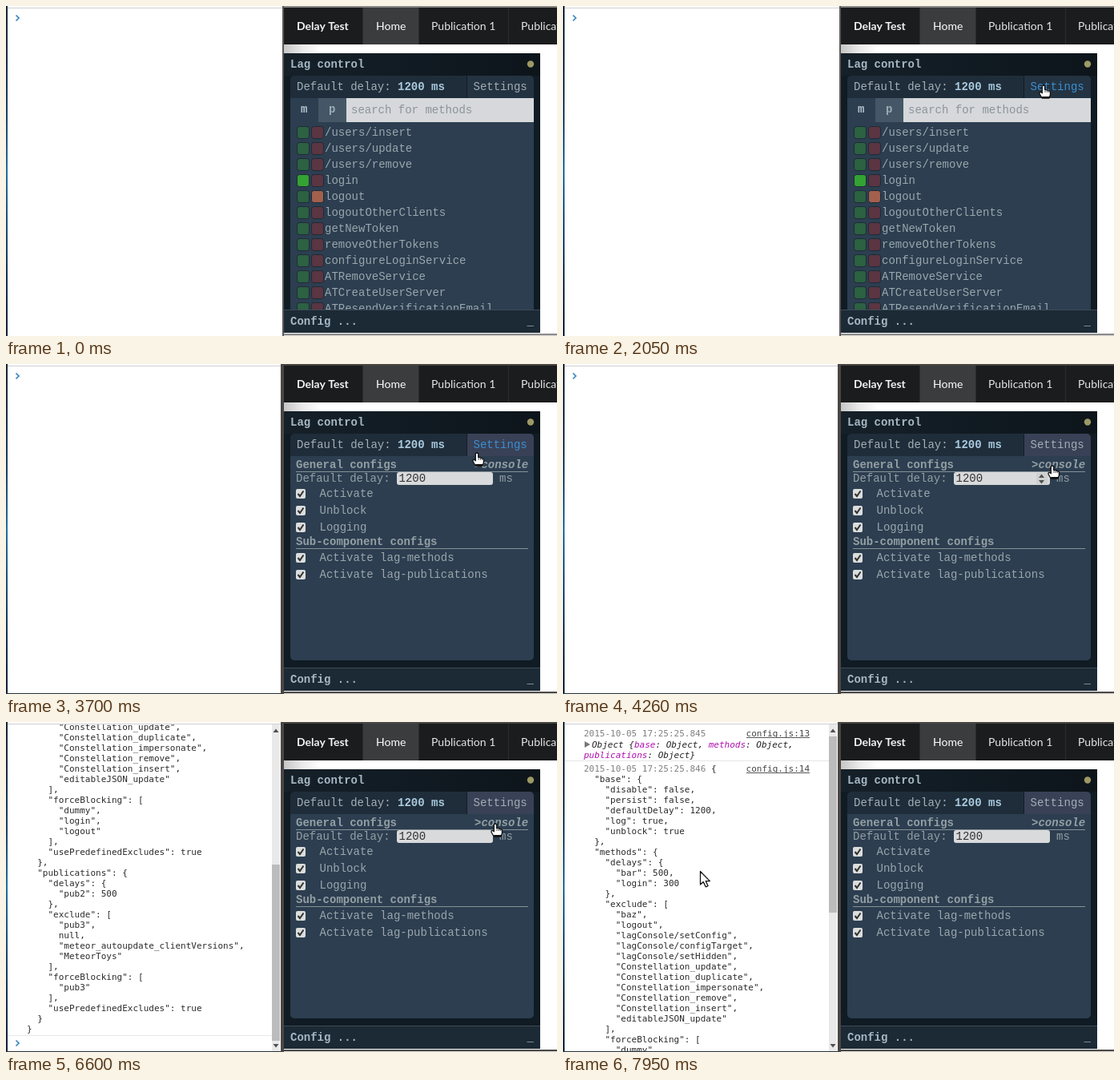
Write an HTML page with a canvas that moves like this. It is 688 by 412 pixels and loops after 8000 ms.

```html
<!DOCTYPE html>
<html lang="en">
<head>
<meta charset="utf-8">
<title>Lag control</title>
<style>
html, body { margin: 0; width: 100%; height: 100%; overflow: hidden; background: #fff; }
canvas { display: block; width: 688px; height: 412px; }
</style>
</head>
<body>
<canvas id="stage" width="688" height="412"></canvas>
<script>
const ctx = document.getElementById('stage').getContext('2d');
const LOOP = 8000;
const MONO = '14px "Liberation Mono", monospace';
const BOLD = 'bold ' + MONO;
const LOG = '11px "DejaVu Sans Mono", monospace';
const NAV = '14px Lato, sans-serif';
const TIP = '14.8px "Open Sans", sans-serif';
const SCROLL_MAX = 299;

const config = {
  base: { disable: false, persist: false, defaultDelay: 1200, log: true, unblock: true },
  methods: {
    delays: { bar: 500, login: 300 },
    exclude: ['baz', 'logout', 'lagConsole/setConfig', 'lagConsole/configTarget',
      'lagConsole/setHidden', 'Constellation_update', 'Constellation_duplicate',
      'Constellation_impersonate', 'Constellation_remove', 'Constellation_insert',
      'editableJSON_update'],
    forceBlocking: ['dummy', 'login', 'logout'],
    usePredefinedExcludes: true
  },
  publications: {
    delays: { pub2: 500 },
    exclude: ['pub3', null, 'meteor_autoupdate_clientVersions', 'MeteorToys'],
    forceBlocking: ['pub3'],
    usePredefinedExcludes: true
  }
};
const logLines = JSON.stringify(config, null, 2).split('\n');
const methods = ['/users/insert', '/users/update', '/users/remove', 'login', 'logout',
  'logoutOtherClients', 'getNewToken', 'removeOtherTokens', 'configureLoginService',
  'ATRemoveService', 'ATCreateUserServer', 'ATResendVerificationEmail'];

// Pointer moves: start, end, from, to
const moves = [
  [970, 1290, 199, 394, 409, 254],
  [1290, 1770, 409, 254, 574, 111],
  [1770, 2050, 574, 111, 600, 99],
  [3660, 3900, 600, 99, 530, 168],
  [4000, 4260, 530, 168, 611, 127],
  [4260, 4430, 611, 127, 620, 116],
  [4580, 4700, 620, 116, 616, 121],
  [6000, 6200, 616, 121, 611, 127],
  [7170, 7570, 611, 127, 171, 186]
];
const arrow = new Path2D('M.5 .5V17L4.2 13.6L7.2 19.8L10 18.6L7.2 12.6H12.4Z');
const hand = new Path2D('M-1.7 1Q0-1 1.7 1V5.4L4.5 5.8L8.4 7.5V12L7 16H-1.8L-5 10.5Q-5.2 8-3.2 8.5L-1.7 9.8Z');

const clamp = v => Math.max(0, Math.min(1, v));
const mix = (a, b, k) => a + (b - a) * k;

function rect(x, y, w, h, color) {
  ctx.fillStyle = color;
  ctx.fillRect(x, y, w, h);
}

function round(x, y, w, h, r, color, stroke) {
  ctx.beginPath();
  ctx.roundRect(x, y, w, h, r);
  ctx.fillStyle = color;
  ctx.fill();
  if (stroke) {
    ctx.strokeStyle = stroke;
    ctx.lineWidth = 1;
    ctx.stroke();
  }
}

function poly(color, ...p) {
  ctx.beginPath();
  for (let i = 0; i < p.length; i += 2) ctx.lineTo(p[i], p[i + 1]);
  ctx.fillStyle = color;
  ctx.fill();
}

function text(str, x, y, font, color) {
  ctx.font = font;
  ctx.fillStyle = color;
  ctx.fillText(str, x, y);
}

function gradient(x0, y0, x1, y1, ...colors) {
  const g = ctx.createLinearGradient(x0, y0, x1, y1);
  colors.forEach((c, i) => g.addColorStop(i / (colors.length - 1), c));
  return g;
}

function prompt(y) {
  ctx.beginPath();
  ctx.moveTo(12.5, y - 3.5);
  ctx.lineTo(16, y);
  ctx.lineTo(12.5, y + 3.5);
  ctx.strokeStyle = '#3a87bd';
  ctx.lineWidth = 1.7;
  ctx.stroke();
}

function scrollAt(t) {
  if (t < 7830) return SCROLL_MAX;
  const step = Math.min(4, Math.floor((t - 7830) / 40) + 1);
  return SCROLL_MAX * (1 - step / 4);
}

function drawLog(scroll) {
  ctx.save();
  ctx.beginPath();
  ctx.rect(2, 3, 330, 408);
  ctx.clip();
  ctx.translate(0, -Math.round(scroll));
  const stamp = (y, end, line) => {
    text('2015-10-05 17:25:25.' + end, 26, y, LOG, '#808080');
    text('config.js:' + line, 228.6, y, LOG, '#454545');
    rect(229, y + 1, 79, 1, '#555');
  };
  stamp(18, 845, 13);
  poly('#777', 27, 24, 34, 28, 27, 32);
  const italic = 'italic ' + LOG;
  let x = 36;
  const put = (s, color) => {
    text(s, x, 32, italic, color);
    x += ctx.measureText(s).width;
  };
  put('Object {', '#222');
  put('base', '#b010b0');
  put(': Object, ', '#222');
  put('methods', '#b010b0');
  put(': Object,', '#222');
  text('publications', 26, 45, italic, '#b010b0');
  text(': Object}', 26 + ctx.measureText('publications').width, 45, italic, '#222');
  rect(2, 48, 330, 1, '#e6e6e6');
  stamp(62, 846, 14);
  logLines.forEach((line, i) => text(line, i ? 26 : 185, 62 + 13 * i, LOG, '#2a2a2a'));
  rect(2, 690, 330, 1, '#e8e8e8');
  prompt(700);
  ctx.restore();

  rect(332, 3, 10, 408, '#e9e9e9');
  rect(332, Math.round(mix(18, 178, scroll / SCROLL_MAX)), 10, 220, '#bcbcbc');
  poly('#505050', 333.5, 13, 337, 8.5, 340.5, 13);
  poly('#505050', 333.5, 402, 337, 406.5, 340.5, 402);
}

function drawLeft(t) {
  rect(0, 0, 346, 412, '#fff');
  rect(0, 0, 2, 412, gradient(0, 0, 0, 412, '#16283a', '#1a2f48', '#1d4468', '#2470a4', '#1b4e7c', '#173250', '#10223a'));
  rect(2, 2, 343, 1, '#cfcfcf');
  if (t < 6600) prompt(15);
  else drawLog(scrollAt(t));
}

function drawPage(active) {
  rect(346, 0, 342, 412, '#fff');
  rect(346, 0, 342, 2, active ? '#4a4744' : '#8b8a88');
  rect(347, 2, 341, 46, '#1b1c1d');
  rect(446, 2, 69, 46, '#3b3c3d');
  [445, 515, 627].forEach(x => rect(x, 2, 1, 46, '#2b2c2d'));
  text('Delay Test', 363, 30, 'bold ' + NAV, '#f2f2f2');
  text('Home', 462, 30, NAV, '#fff');
  text('Publication 1', 531, 30, NAV, '#e6e6e6');
  text('Publication 2', 643, 30, NAV, '#e6e6e6');
  rect(347, 48, 46, 11, gradient(347, 0, 393, 0, '#c6c6c6', '#eaeaea', '#fff'));
  const edge = active ? '#4a4744' : '#8b8a88';
  rect(346, 408, 342, 1, '#fff');
  rect(346, 409, 342, 2, edge);
  rect(346, 411, 342, 1, '#d5d5d5');
  if (active) {
    rect(343, 0, 4, 412, '#4a4644');
    rect(0, 411, 343, 1, '#26323c');
  } else {
    rect(345, 0, 2, 412, '#5b5957');
  }
}

function drawMethods() {
  rect(355, 115, 304, 264, '#2c3e50');
  rect(390, 115, 35, 30, '#455766');
  rect(425, 115, 234, 30, '#d6d8db');
  text('m', 368, 133, BOLD, '#b4c2cc');
  text('p', 403, 133, BOLD, '#9cacb7');
  text('search for methods', 431, 134, MONO, '#8c9499');
  ctx.save();
  ctx.beginPath();
  ctx.rect(355, 145, 304, 234);
  ctx.clip();
  methods.forEach((name, i) => {
    const y = 150.5 + 20 * i;
    round(363.5, y, 15, 15, 3, name === 'login' ? '#33a333' : '#2c6142', '#1c2b36');
    round(381.5, y, 15, 15, 3, name === 'logout' ? '#a2604d' : '#5b3542', '#1f2a35');
    text(name, 398, 162 + 20 * i, MONO, '#9aa6ab');
  });
  ctx.restore();
}

function checkRow(label, y) {
  round(362, y - 5, 12, 12, 2, '#dcdddd');
  ctx.beginPath();
  ctx.moveTo(364.5, y + 1);
  ctx.lineTo(367, y + 4);
  ctx.lineTo(371.5, y - 2.5);
  ctx.strokeStyle = '#333';
  ctx.lineWidth = 2;
  ctx.stroke();
  text(label, 391.5, y + 5, MONO, '#9aa6ab');
}

function drawSettings(spinner) {
  round(355, 115, 304, 255, [0, 0, 5, 5], '#2c3e50');
  text('General configs', 362, 130, BOLD, '#949fa4');
  text('>console', 585, 130, 'italic ' + BOLD, '#949fa4');
  rect(362, 134, 290, 1, '#879197');
  text('Default delay:', 362, 147, MONO, '#949fa4');
  round(488, 135, 120, 16, 3, '#d8dadb');
  text('1200', 490.5, 147, MONO, '#333');
  text('ms', 616, 147, MONO, '#949fa4');
  if (spinner) {
    rect(591, 136, 14, 14, '#cfd0d0');
    poly('#505050', 594, 142, 597.5, 137.5, 601, 142);
    poly('#505050', 594, 145, 597.5, 149.5, 601, 145);
  }
  checkRow('Activate', 161);
  checkRow('Unblock', 182);
  checkRow('Logging', 203);
  text('Sub-component configs', 362, 226, BOLD, '#949fa4');
  rect(362, 230, 290, 1, '#879197');
  checkRow('Activate lag-methods', 241);
  checkRow('Activate lag-publications', 262);
}

function drawPanel(t) {
  rect(347, 59, 320, 349, '#101b23');
  rect(347, 59, 320, 28, gradient(347, 0, 667, 0, '#152029', '#0d151b'));
  text('Lag control', 355, 77, BOLD, '#a6b8c4');
  ctx.beginPath();
  ctx.arc(655, 72.5, 4.2, 0, 7);
  ctx.fillStyle = '#9c9965';
  ctx.fill();

  round(355, 87, 304, 28, [5, 5, 0, 0], '#1f2d3a');
  const k = clamp((t - 3240) / 240);
  const tab = [[36, 57], [51, 65], [65, 86]].map(([a, b]) => Math.round(mix(a, b, k)));
  round(576, 87, 83, 28, [0, 5, 0, 0], `rgb(${tab})`);
  rect(575, 87, 1, 28, '#121c25');
  text('Default delay: ', 363, 105, MONO, '#a2afb7');
  text('1200 ms', 489, 105, BOLD, '#a9cade');
  const hover = t >= 1810 && t < 3740;
  text('Settings', 583.5, 105, MONO, hover ? '#3b8fd2' : '#a3adb3');

  if (t < 3330) drawMethods();
  else drawSettings(t >= 3780 && t < 5050);

  rect(347, 379, 320, 29, '#1c2a36');
  rect(347, 379, 320, 1, '#3c4a56');
  text('Config ...', 355, 398, BOLD, '#a6b8c4');
  text('_', 650.5, 398, MONO, '#a6b8c4');
}

function tooltip(str, x, y, alpha) {
  if (alpha <= 0) return;
  ctx.save();
  ctx.globalAlpha = alpha;
  ctx.shadowColor = 'rgba(0,0,0,.35)';
  ctx.shadowBlur = 26;
  ctx.shadowOffsetY = 3;
  rect(x, y, 700 - x, 21, '#000');
  ctx.shadowColor = 'transparent';
  text(str, x + 3, y + 16, TIP, '#fff');
  ctx.restore();
}

// Value of the last [time, value] pair already reached
const stepAt = (t, pairs) => pairs.reduce((v, [at, next]) => t >= at ? next : v, 0);

function drawPointer(t) {
  if (t < 970) return;
  let x, y;
  for (const [start, end, x0, y0, x1, y1] of moves) {
    if (t < start) break;
    const held = t >= end ? end : start + Math.floor((t - start) / 40) * 40;
    const k = clamp((held - start) / (end - start));
    x = mix(x0, x1, k);
    y = mix(y0, y1, k);
  }
  const isHand = (t >= 1810 && t < 3740) || (t >= 4220 && t < 7250);
  const shape = isHand ? hand : arrow;
  ctx.save();
  ctx.translate(Math.round(x), Math.round(y));
  ctx.lineJoin = 'round';
  ctx.strokeStyle = '#111';
  ctx.lineWidth = 1.3;
  ctx.fillStyle = '#fff';
  ctx.fill(shape);
  ctx.stroke(shape);
  if (isHand) {
    [1.7, 4, 6.2].forEach(fx => rect(fx, 6, 0.8, 3, '#222'));
    rect(-1.8, 14, 9, 2, '#111');
  }
  ctx.restore();
}

function draw(t) {
  drawLeft(t);
  drawPage(t >= 3240);
  drawPanel(t);
  tooltip('Toggle settings view', 541, 116, stepAt(t, [[2590, 0.5], [2630, 1], [3240, 0.1], [3290, 0]]));
  tooltip('Print configs to browser console', 460, 138, stepAt(t, [[5050, 0.35], [5120, 0.7], [5200, 1], [6420, 0.4], [6460, 0]]));
  drawPointer(t);
}

const begin = performance.now();
function tick() {
  draw((performance.now() - begin) % LOOP);
  requestAnimationFrame(tick);
}
tick();
</script>
</body>
</html>
```
